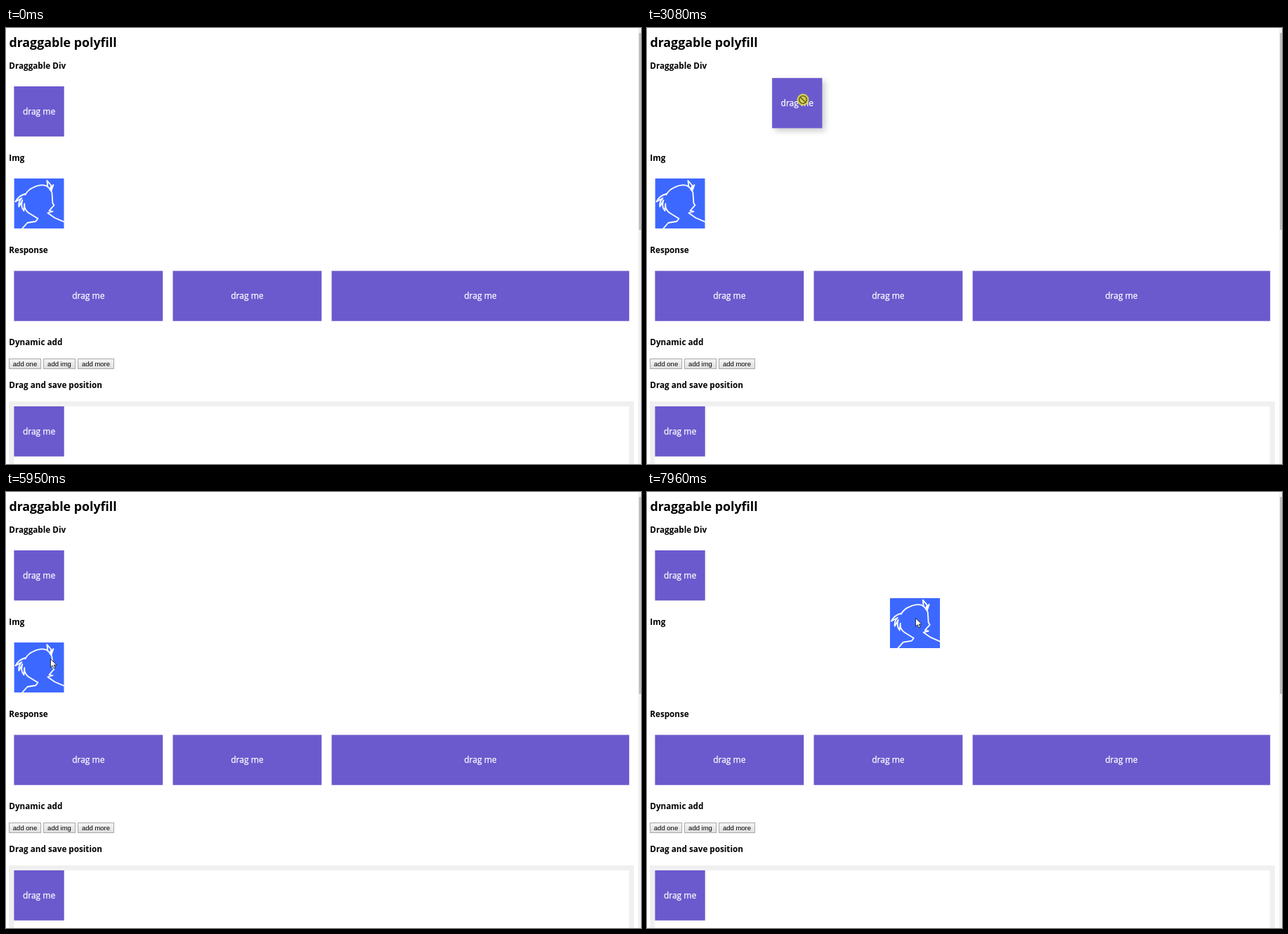
Animation, 904 px wide and 620 px high, one loop 8 s. Source, as an HTML page:

```html
<!DOCTYPE html>
<html lang="en">
<head>
<meta charset="utf-8">
<title>draggable polyfill</title>
<style>
  html, body { margin: 0; width: 100%; height: 100%; overflow: hidden; background: #fff; }
  svg { display: block; }
  text { font-family: "Open Sans", "Noto Sans", sans-serif; }
  .head { font-weight: 700; font-size: 11.7px; fill: #000; }
  .title { font-size: 17.8px; }
  .label { font-size: 12px; fill: #fff; stroke: #fff; stroke-width: .25px; text-anchor: middle; }
  .btn { font: 9.5px "Liberation Sans", Arial, sans-serif; fill: #000; text-anchor: middle; }
  .lifted { filter: drop-shadow(4px 4px 4px rgba(0, 0, 0, .2)); }
</style>
</head>
<body>
<svg width="904" height="620" viewBox="0 0 904 620">
  <defs>
    <linearGradient id="face" x2="0" y2="1">
      <stop offset="0" stop-color="#f6f6f6"/>
      <stop offset="1" stop-color="#dedede"/>
    </linearGradient>
    <clipPath id="frame"><rect width="71.3" height="71.3"/></clipPath>
  </defs>
  <rect x="900" width="4" height="620" fill="#f1f1f1"/>
  <rect x="901" y="7" width="3" height="280" fill="#c1c1c1"/>
  <path d="M4.3 531H894V620H886.8V538H11.4V620H4.3Z" fill="#f0f0f0"/>
  <g id="page"></g>
  <g id="box"></g>
  <g id="avatar">
    <g clip-path="url(#frame)">
      <rect width="71.3" height="71.3" fill="#3d68ff"/>
      <g fill="none" stroke="#fff" stroke-width="1.8" stroke-linejoin="round" stroke-linecap="round">
        <path d="M16 23Q20 16 27 13Q37 8 45 10Q51 13 54 20L55 35L57 38L50 46L55 47L48 49L58 56L72 62"/>
        <path d="M48 12L47 3L53 10L51 16L56 9L53 18"/>
        <path d="M16 22Q7 24 2 33L11 28Q6 33 7 40L12 31Q9 40 14 46L15 36Q14 44 21 49L34 57L31 61L19 63L11 72"/>
      </g>
    </g>
  </g>
  <path id="arrow" d="M.4 .4V12.2L3.1 9.7L5 14L7.1 13.1L5.2 9H9.2Z" fill="#fff" stroke="#222" stroke-width=".9"/>
  <g id="ban">
    <circle r="8.5" fill="#dcd548" opacity=".9"/>
    <path d="M-3.8 -3.8L3.8 3.8M5.4 0A5.4 5.4 0 1 1 -5.4 0A5.4 5.4 0 1 1 5.4 0" fill="none" stroke="#5b5820" stroke-width="1.4"/>
  </g>
</svg>
<script>
const LOOP = 8000, STEP = 78, SIZE = 71.3, LEFT = 11.4, GAP = 14.3;
const [page, box, avatar, arrow, ban] =
  ['page', 'box', 'avatar', 'arrow', 'ban'].map(id => document.getElementById(id));

function add(parent, tag, attrs, text = '') {
  const el = document.createElementNS('http://www.w3.org/2000/svg', tag);
  for (const k in attrs) el.setAttribute(k, attrs[k]);
  el.textContent = text;
  parent.append(el);
}

function tile(parent, x, y, width = SIZE) {
  add(parent, 'rect', { x, y, width, height: SIZE, fill: '#6a5acd' });
  add(parent, 'text', { x: x + width / 2, y: y + 40, class: 'label' }, 'drag me');
}

add(page, 'text', { x: 4.4, y: 26.5, class: 'head title' }, 'draggable polyfill');
['Draggable Div', 'Img', 'Response', 'Dynamic add'].forEach((text, i) =>
  add(page, 'text', { x: 4.3, y: 58 + i * 131, class: 'head' }, text));
add(page, 'text', { x: 4.3, y: 512, class: 'head' }, 'Drag and save position');

const third = 211.8;
for (let i = 0; i < 3; i++) tile(page, LEFT + i * (third + GAP), 345.4, i < 2 ? third : 2 * third);
tile(page, LEFT, 538);
tile(box, 0, 0);

let left = 4;
for (const name of ['one', 'img', 'more']) {
  const w = name === 'more' ? 52 : 46;
  add(page, 'rect', { x: left + .5, y: 470.5, width: w - 1, height: 14, fill: 'url(#face)', stroke: '#a9a9a9' });
  add(page, 'text', { x: left + w / 2, y: 481, class: 'btn' }, 'add ' + name);
  left += w + 3;
}

// Pointer waypoints: time, x, y.
const path = [
  [300, 880, 660], [360, 846, 611], [990, 588, 273], [1150, 588, 273], [1980, 49, 114], [2150, 49, 114],
  [2630, 78, 120], [3020, 222, 102], [3700, 369, 108], [3880, 377, 122], [4250, 358, 142], [4810, 279, 121.5],
  [4960, 279, 120], [5410, 279, 120], [5950, 63, 237], [6030, 48, 242], [6100, 48, 242],
  [6640, 166, 196], [6690, 186, 181], [6970, 314, 129], [7230, 333.5, 199], [7580, 333.5, 199],
  [7780, 382, 179], [7960, 382, 179]
];

const items = [
  { el: box, home: [LEFT, 83], grip: [38, 31], lag: 20, grab: 2230, end: 5260 },
  { el: avatar, home: [LEFT, 214], grip: [36.3, 28.3], lag: 50, grab: 6180, end: LOOP }
];

const legAt = t => Math.max(0, path.findLastIndex(p => p[0] <= t));
const slope = (i, c) => (path[i + 1][c] - path[i][c]) / (path[i + 1][0] - path[i][0]);

// Harmonic mean of the neighbouring slopes: smooth, and never overshoots.
function tangent(i, c) {
  if (i === 0 || i === path.length - 1) return 0;
  const a = slope(i - 1, c), b = slope(i, c);
  return a * b > 0 ? 2 * a * b / (a + b) : 0;
}

function pointer(t) {
  const i = legAt(t), a = path[i], b = path[i + 1];
  if (!b) return a.slice(1);
  const d = b[0] - a[0], u = (t - a[0]) / d, v = 1 - u;
  return [1, 2].map(c =>
    a[c] * (1 + 2 * u) * v * v + b[c] * u * u * (3 - 2 * u) +
    d * u * v * (v * tangent(i, c) - u * tangent(i + 1, c)));
}

// The screen refreshes in steps, counted from the last waypoint.
function snap(time) {
  const start = path[legAt(time)][0];
  return start + Math.floor(Math.max(0, time - start) / STEP) * STEP;
}

const place = (el, [x, y]) => el.setAttribute('transform', `translate(${x.toFixed(2)} ${y.toFixed(2)})`);
const show = (el, on) => el.setAttribute('visibility', on ? 'visible' : 'hidden');

function draw(time) {
  const t = snap(time), tip = pointer(t);
  // Dragged items trail the pointer a little.
  for (const { el, home, grip, lag, grab, end } of items) {
    const held = time >= grab && time < end;
    place(el, held ? pointer(t - lag).map((p, c) => p - grip[c]) : home);
    if (el === box) el.setAttribute('class', held ? 'lifted' : '');
  }
  const banned = (time >= 2230 && time < 5180) || (time >= 6180 && time < 7960);
  place(arrow, tip);
  place(ban, tip);
  show(arrow, time >= 360 && !banned);
  show(ban, banned);
}

function loop() {
  draw(performance.now() % LOOP);
  requestAnimationFrame(loop);
}
loop();
</script>
</body>
</html>
```
